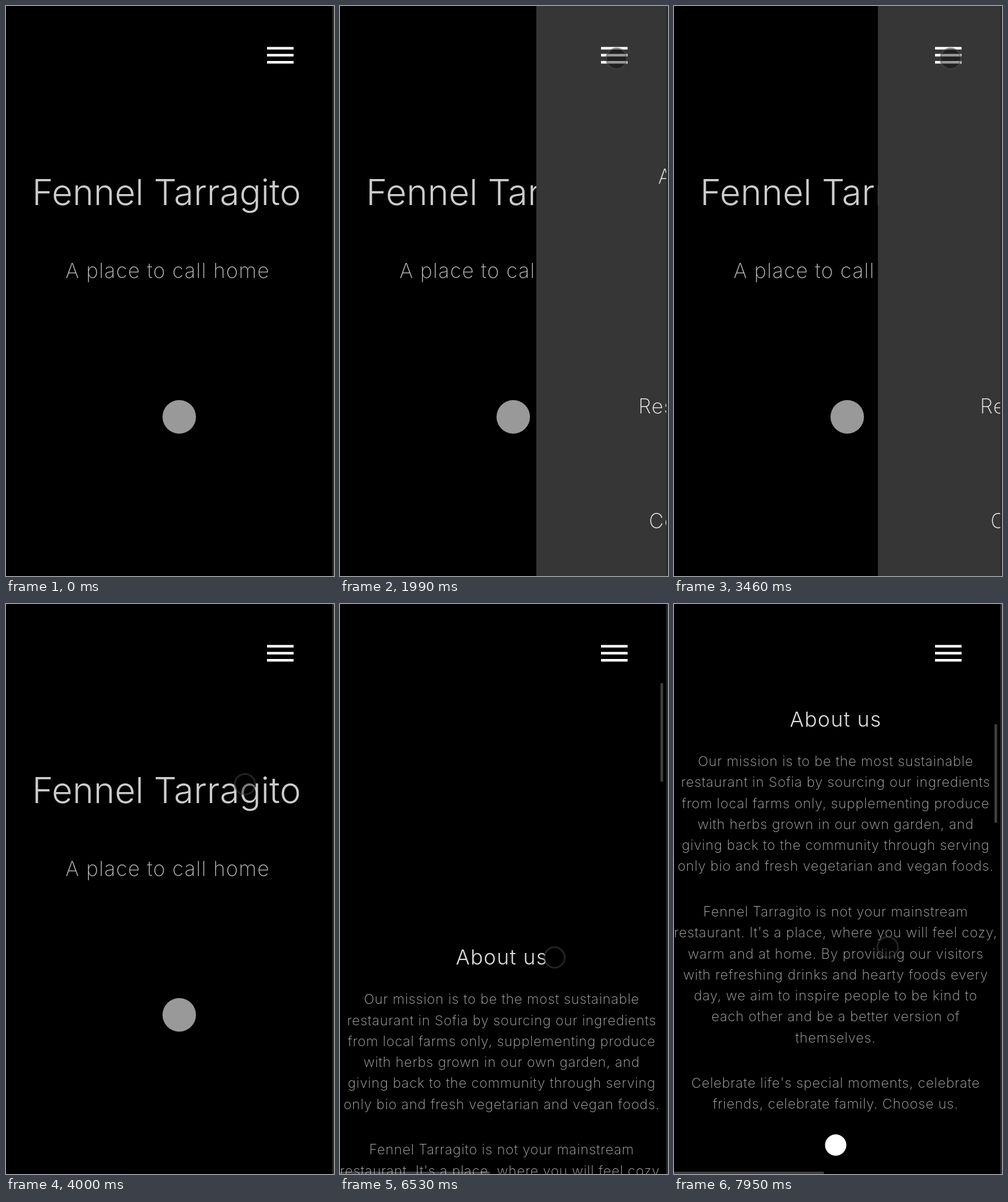
Animation of 568x985 px, one loop 8 s. Source, as an HTML page:

```html
<!DOCTYPE html>
<html lang="en">
<head>
<meta charset="utf-8">
<title>Restaurant page</title>
<style>
  html, body { margin: 0; width: 100%; height: 100%; overflow: hidden; background: #000; }
  svg { display: block; width: 100%; height: 100%; }
  text {
    font-family: Inter, Lato, sans-serif;
    font-optical-sizing: none;
    font-weight: 200;
    letter-spacing: .035em;
    text-anchor: middle;
  }
  .title { font-size: 62px; font-weight: 300; letter-spacing: 0; fill: #ccc; }
  .sub { font-size: 35.5px; fill: #b4b4b4; }
  .head { font-size: 36px; font-weight: 300; fill: #ddd; }
  .body { font-size: 23.7px; fill: #b0b0b0; }
  .item { font-size: 35px; fill: #eee; }
  .bar { fill: #fff; fill-opacity: .25; }
</style>
</head>
<body>
<svg viewBox="0 0 568 985">
  <rect width="568" height="985"/>
  <g id="page">
    <text class="title" x="278" y="344">Fennel Tarragito</text>
    <text class="sub" x="280" y="470">A place to call home</text>
    <circle cx="300" cy="710" r="29" fill="#999"/>
    <text class="head" x="280" y="1412">About us</text>
    <circle cx="280" cy="2135" r="18.5" fill="#fff"/>
  </g>
  <rect width="565" height="172"/>
  <g id="scrollbars">
    <rect id="thumb" class="bar" x="555" width="4.5" height="170"/>
    <rect class="bar" y="981" width="259.5" height="4"/>
  </g>
  <g id="panel"><rect x="-7" width="580" height="985" fill="#363636"/></g>
  <path d="M452 73h46M452 85h46M452 97.2h46" stroke="#fff" stroke-width="4.6"/>
  <g id="cursor"><circle r="17.5"/><circle r="17.7" fill="none" stroke-width="3"/></g>
  <rect x="565" width="3" height="985" fill="#2b2b2b"/>
</svg>
<script>
const LOOP = 8000;
const $ = id => document.getElementById(id);
const page = $('page'), panel = $('panel'), cursor = $('cursor');
const [disc, ring] = cursor.children;

function addText(parent, cls, y, str) {
  const el = document.createElementNS('http://www.w3.org/2000/svg', 'text');
  el.setAttribute('class', cls);
  el.setAttribute('x', 280);
  el.setAttribute('y', y);
  el.textContent = str;
  parent.append(el);
}

['Home', 'About us', 'Menu', 'Reservations', 'Contact us']
  .forEach((name, i) => addText(panel, 'item', 109 + i * 198.3, name));

const paragraphs = [
  [1480, `Our mission is to be the most sustainable
restaurant in Sofia by sourcing our ingredients
from local farms only, supplementing produce
with herbs grown in our own garden, and
giving back to the community through serving
only bio and fresh vegetarian and vegan foods.`],
  [1740, `Fennel Tarragito is not your mainstream
restaurant. It's a place, where you will feel cozy,
warm and at home. By providing our visitors
with refreshing drinks and hearty foods every
day, we aim to inspire people to be kind to
each other and be a better version of
themselves.`],
  [2036, `Celebrate life's special moments, celebrate
friends, celebrate family. Choose us.`]
];
for (const [y, block] of paragraphs)
  block.split('\n').forEach((line, i) => addText(page, 'body', y + i * 36.25, line));

// Wheel ticks: start, duration
const ticks = [[4660, 180], [4992, 220], [5400, 220], [5620, 215],
  [6020, 350], [6458, 220], [6690, 230], [7190, 430]];
const TICK = 150;

// Pointer path: time, x, y
const path = [[70, 552, 899], [440, 527, 273], [610, 527, 273], [1290, 479, 91],
  [3710, 479, 91], [3850, 462, 140], [4000, 414, 310], [4230, 374, 647],
  [4310, 374, 647], [4460, 371.5, 611], [7790, 371.5, 610.5], [7950, 370, 593]];

const ramp = (t, start, dur) => Math.min(1, Math.max(0, (t - start) / dur));
const ease = (t, start, dur) => {
  const k = ramp(t, start, dur);
  return k * k * (3 - 2 * k);
};

function pointAt(t) {
  const i = path.findIndex(p => p[0] > t);
  if (i < 0) return path[path.length - 1].slice(1);
  if (i === 0) return path[0].slice(1);
  const [t0, x0, y0] = path[i - 1], [t1, x1, y1] = path[i];
  const k = ramp(t, t0, t1 - t0);
  return [x0 + (x1 - x0) * k, y0 + (y1 - y0) * k];
}

function draw(t) {
  const scroll = ticks.reduce((sum, [start, dur]) => sum + TICK * ease(t, start, dur), 0);
  page.setAttribute('transform', `translate(0 ${-scroll})`);
  $('scrollbars').style.display = t >= 4690 ? '' : 'none';
  $('thumb').setAttribute('y', 0.7 + scroll / 5.79);

  const open = ease(t, 1800, 445) - ease(t, 3200, 445);
  panel.setAttribute('transform', `translate(${573 * (1 - open)} 0)`);

  const pressed = (t >= 1590 && t < 1750) || (t >= 3000 && t < 3150);
  cursor.style.display = t >= 70 ? '' : 'none';
  cursor.setAttribute('transform', `translate(${pointAt(t)})`);
  disc.setAttribute('r', pressed ? 18.5 : 17.5);
  disc.setAttribute('fill', pressed ? 'rgba(170,165,0,.7)' : 'rgba(0,0,0,.4)');
  ring.setAttribute('r', pressed ? 18.5 : 17.7);
  ring.setAttribute('stroke', pressed ? 'rgba(185,180,20,.5)' : 'rgba(70,70,70,.5)');
}

const begin = performance.now();
function tick() {
  draw((performance.now() - begin) % LOOP);
  requestAnimationFrame(tick);
}
tick();
</script>
</body>
</html>
```
